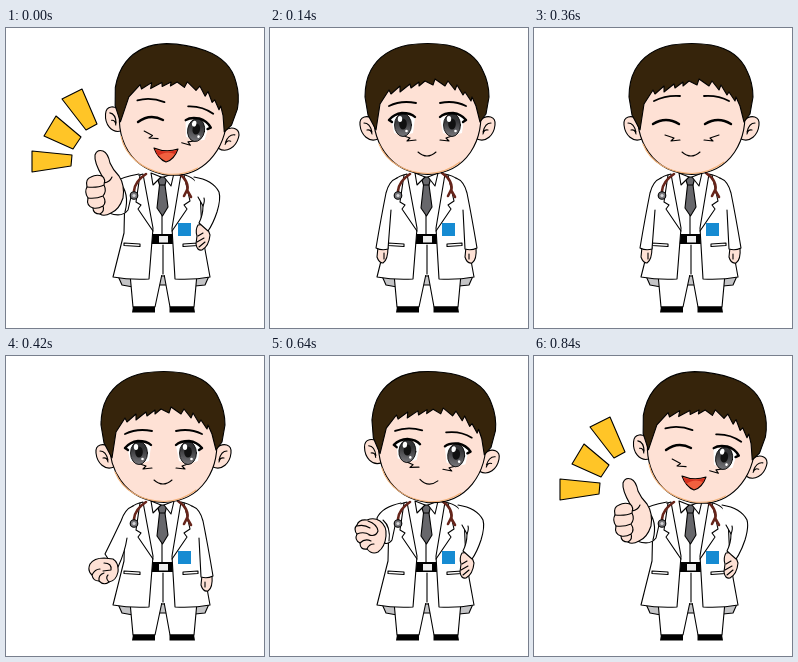
An HTML page for the animation above (0.98 s loop, 258 by 300 pixels).

```html
<!DOCTYPE html>
<html lang="en">
<head>
<meta charset="utf-8">
<title>Cheerful doctor</title>
<style>
html, body { margin: 0; width: 100%; height: 100%; overflow: hidden; background: #fff; }
svg { display: block; width: 100vw; height: 100vh; }
.line { fill: none; }
.skin { fill: #fee1d5; }
.white { fill: #fff; }
.gray { fill: #c4c4c6; }
.ray { fill: #ffc527; }
.hair { fill: #36240b; }
.thick { fill: none; stroke-width: 2.4; }
.brow { fill: none; stroke-width: 1.8; }
.tube { fill: none; stroke: #66241a; stroke-width: 2.6; }
</style>
</head>
<body>
<svg viewBox="0 0 258 300" stroke="#000" stroke-width="1.1" stroke-linejoin="round" stroke-linecap="round">
  <defs>
    <linearGradient id="iris" x2="0" y2="1">
      <stop offset=".3" stop-color="#343436"/><stop offset="1" stop-color="#77777b"/>
    </linearGradient>
    <g id="eye">
      <path class="white" stroke="none" d="M-12-6Q0-13 12-6L10 9Q0 13-9 9Z"/>
      <ellipse cy="1" rx="8.5" ry="11.5" fill="url(#iris)" stroke-width=".8"/>
      <ellipse rx="3.8" ry="5.5" fill="#111" stroke="none"/>
      <ellipse cx="-3" cy="-5" rx="2.2" ry="3" fill="#fff" stroke="none"/>
      <circle cx="3.500" cy="7" r="1.300" fill="#fff" stroke="none"/>
    </g>
    <path id="lid" class="thick" d="M-14-4Q-9-10-1-11Q8-11 12-7M-14-4L-11-2"/>
    <path id="zigzag" class="line" d="M131 107L140 110L137 113L146 112"/>
    <g id="ear">
      <path class="skin" d="M106 93C97 85 89 89 90 97C91 107 99 115 108 111Z"/>
      <path class="line" d="M94 95Q100 95 102 104M97 102Q101 101 102 106"/>
    </g>
  </defs>

  <!-- coat lining and legs -->
  <path class="gray" d="M112 248L116 257L127 259L152 257H163L189 258L199 257L203 248Z"/>
  <path class="white" d="M124 246L127 279L149 279L156 246H158L164 279L188 279L191 246Z"/>
  <path d="M127 278.500H149V284.500H126ZM163.500 278.500H188L189 284.500H163.500Z" fill="#000" stroke="none"/>

  <!-- shirt, belt, tie -->
  <path class="white" stroke="none" d="M136 145H176L170 247H143Z"/>
  <path class="line" d="M156 187V206M157 217V246"/>
  <path d="M144 206H170V216H144Z" fill="#000" stroke="none"/>
  <path d="M153 208H162V214.500H153Z" fill="#eee" stroke="none"/>
  <path d="M151 149H161L159 157L162 179L156.500 188L151 180L153.500 157Z" fill="#67676b"/>
  <path d="M153.500 157H159" class="line"/>
  <path class="white" d="M145 145L147 157L155 149ZM158 149L165 158L168 145Z"/>

  <!-- coat -->
  <path class="white" d="M137 146Q122 149 119 162L118 205L107 249Q124 252 143 251L147 200L137 146Z"/>
  <path class="white" d="M175 146Q191 149 194 162L196 205L204 249Q188 252 169 251L166 200Z"/>
  <path class="line" d="M134 147L130 174L135 177L132 181L147 203M178 147L184 173L178 177L181 181L166 203"/>
  <path class="white" d="M118 215L134 216V218.500L118 217.500ZM177 216L192 215V217.500L177 218.500Z"/>
  <rect x="172" y="195" width="13" height="13" fill="#168bd2" stroke="none"/>

  <!-- right-hand arm -->
  <g data-on="123">
    <path class="skin" d="M196 219L195 229Q197 236 202 235Q207 232 206 219Z"/>
    <path class="line" d="M199 226V231"/>
    <path class="white" d="M186 150Q194 153 197 165Q202 190 207 220Q201 223 195 221L193 182"/>
  </g>
  <g data-on="0456">
    <path class="skin" d="M192 197Q189 202 191 208L190 216Q191 223 196 222Q203 218 204 207L200 196Z"/>
    <path class="line" d="M192 208L197 205M191 214L198 210M193 219L199 214"/>
    <path class="white" d="M188 149Q207 152 213 164Q215 171 211 184Q207 196 202 203L193 195Q197 187 197 178L192 169"/>
    <path class="line" d="M197 178Q199 173 198 170"/>
  </g>

  <!-- left-hand arm -->
  <g data-on="12">
    <path class="skin" d="M108 219L107 229Q109 235 113 235Q118 232 118 219Z"/>
    <path class="line" d="M114 225V231"/>
    <path class="white" d="M127 150Q119 153 116 165Q111 190 106 220Q112 223 118 221L121 182"/>
  </g>
  <g data-on="3">
    <path class="white" d="M127 150Q119 153 115 165Q107 182 99 198Q106 210 112 211Q119 196 121 182"/>
    <path class="skin" d="M98 202Q88 202 84 208Q81 215 86 219Q87 225 93 225Q98 230 103 226Q110 225 112 216Q113 207 107 203Z"/>
    <path class="line" d="M86 219Q89 213 94 213M93 225Q92 219 98 217M103 226Q99 222 102 219M98 207Q106 207 105 214L97 215"/>
  </g>
  <g data-on="4">
    <path class="white" d="M131 147Q112 151 107 162L110 184Q117 191 122 184L125 170"/>
    <path class="line" d="M113 164Q121 171 119 185"/>
    <path class="skin" d="M97 164Q89 163 87 169Q83 173 87 178Q84 184 90 187Q90 194 97 193Q102 199 108 196Q115 191 116 180Q117 170 110 165Q104 161 97 164Z"/>
    <path class="line" d="M87 170Q94 168 100 172M87 178Q94 175 100 179M90 187Q95 182 101 185M97 193Q99 188 104 188M98 165Q107 168 108 175Q106 181 99 179"/>
  </g>
  <g data-on="056">
    <path class="white" d="M133 146Q115 149 107 155L103 185Q116 190 122 182L125 169"/>
    <path class="line" d="M113 154Q124 165 119 184"/>
    <path class="skin" d="M96 148Q88 134 89 127Q91 121 97 123Q102 125 104 135Q107 142 113 148Q119 157 117 170Q113 182 105 185Q98 189 94 186Q87 186 87 180Q80 178 82 170Q78 164 81 159Q79 151 85 149Q90 146 96 148Z"/>
    <path class="line" d="M96 148Q100 151 98 157Q92 160 81 159M98 157Q101 163 97 168Q90 171 82 170M97 168Q101 174 97 178Q92 181 87 180M97 178Q99 183 94 186M98 155Q104 154 106 149"/>
  </g>

  <!-- stethoscope -->
  <path class="tube" d="M140 146Q129 153 128 163M172 145Q184 153 181 164M181 162L178 168M181 162L185 169"/>
  <circle cx="128" cy="167.500" r="3.800" fill="#77777b"/>
  <circle cx="128" cy="167.500" r="1.600" fill="#d5d5d8" stroke="none"/>

  <!-- head -->
  <g id="head">
    <use href="#ear"/>
    <use href="#ear" transform="matrix(-1 0 0 1 315 0)"/>
    <path class="skin" d="M104 76C100 112 118 145 158 146.500C197 145 215 112 210 76L200 48H115Z"/>
    <path class="line" stroke="#f3b178" d="M109 116C117 136 137 145 158 145.500Q176 145 190 134"/>
    <path class="hair" d="M106 102L98 87L95 69Q95 53 101 42Q112 22 138 17Q158 14 177 17Q204 22 213 43Q219 55 219 69L216 86L210 94L206 78L202 69L201 73L195 64L193 67L187 57L185 62L178 53L175 58L165 51L163 57L155 53L149 58L149 54L141 60L140 56L130 64L130 58L121 66L119 62L110 76Z"/>
    <use href="#zigzag"/>
    <use href="#zigzag" transform="matrix(-1 0 0 1 316 0)"/>
    <g data-on="1345">
      <use href="#eye" x="133" y="96"/>
      <use href="#lid" x="133" y="96"/>
    </g>
    <g data-on="013456">
      <path class="brow" d="M119 78Q131 72 146 75M170 75Q184 72 196 78"/>
      <use href="#eye" x="182" y="96"/>
      <use href="#lid" transform="matrix(-1 0 0 1 182 96)"/>
    </g>
    <g data-on="2">
      <path class="brow" d="M120 73Q132 67 146 68M170 68Q184 67 195 73"/>
      <path class="thick" d="M119 96Q132 88 145 96M171 96Q184 88 197 96"/>
    </g>
    <path data-on="12345" class="line" d="M148 124Q157 132 166 124"/>
  </g>
  <g data-on="06">
    <path class="thick" d="M132 94Q144 85 157 92"/>
    <path fill="#f0603f" d="M148 120Q160 125 172 121Q168 132 160 134Q152 131 148 120Z"/>
    <path fill="#d5301f" stroke="none" d="M149 121.500Q160 125.500 171 122L169 126Q160 122 152 128Z"/>
  </g>

  <!-- rays -->
  <path data-on="06" class="ray" d="M56 71L76 61L91 96L80 102ZM50 88L75 109L67 121L38 108ZM26 123L66 127L65 138L26 144Z"/>
  <path data-on="5" class="ray" d="M62 79L79 69L91 95L81 103ZM41 80L75 107L67 120L28 101ZM35 123L66 127L65 138L36 144Z"/>
</svg>
<script>
const STEP = 140;
const tilts = [10, 0, 0, 0, 5, 10, 10];
const head = document.getElementById("head");
const parts = document.querySelectorAll("[data-on]");

function draw() {
  const pose = Math.floor(performance.now() / STEP) % tilts.length;
  head.setAttribute("transform", `rotate(${tilts[pose]} 157 146)`);
  for (const part of parts) {
    part.style.display = part.dataset.on.includes(pose) ? "" : "none";
  }
  requestAnimationFrame(draw);
}
draw();
</script>
</body>
</html>
```
